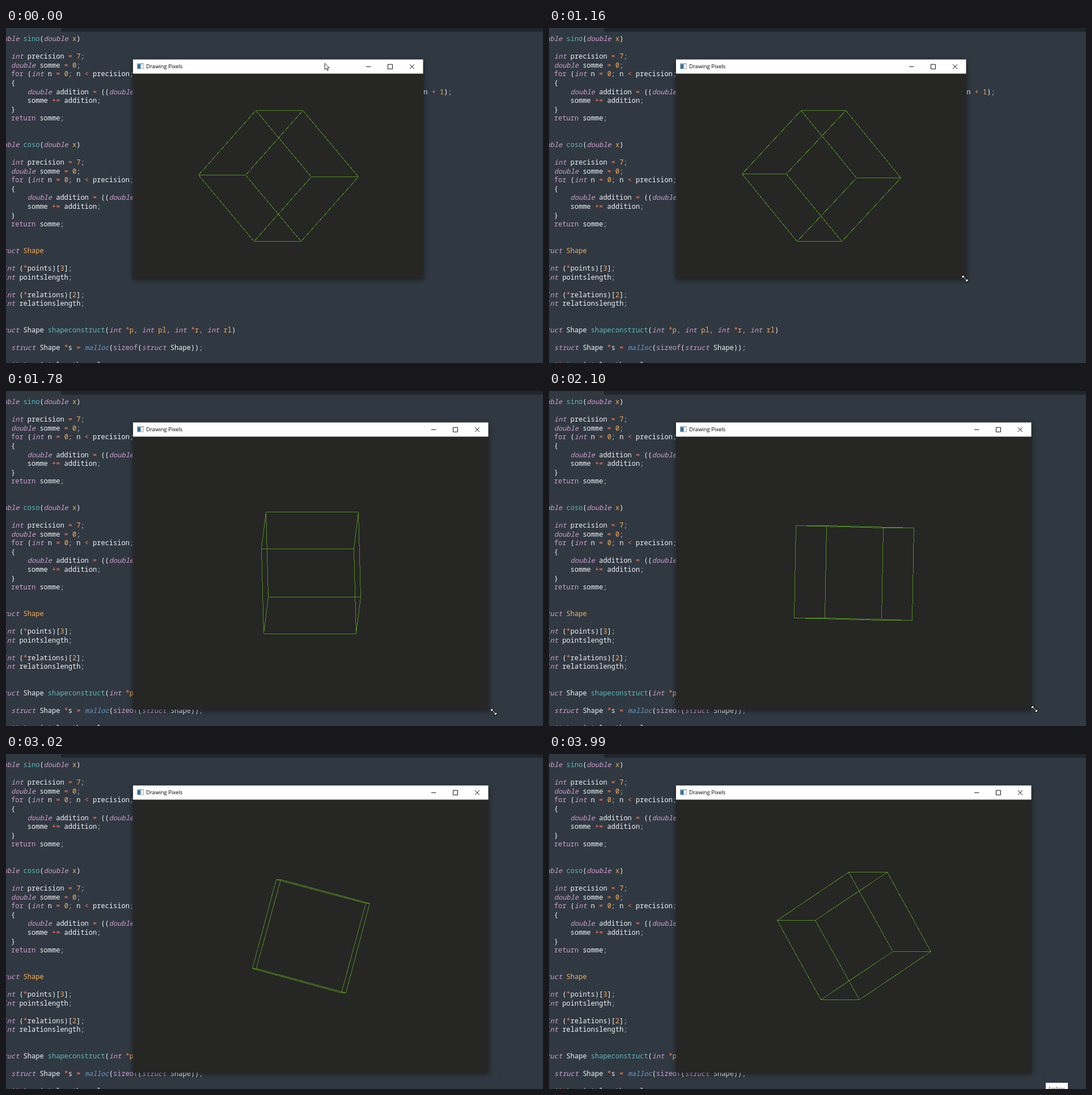
An HTML page for the animation above (4060 ms loop, 947 px wide and 591 px high).

```html
<!DOCTYPE html>
<html lang="en">
<head>
<meta charset="utf-8">
<title>Rotating wireframe cube</title>
<style>
html, body { margin: 0; width: 100%; height: 100%; overflow: hidden; background: #303841; }
svg { display: block; width: 947px; height: 591px; }
text { white-space: pre; }
#code { font: 500 12px "Noto Sans Mono", "DejaVu Sans Mono", monospace; fill: #f0f4f8; }
.type { fill: #d09fd0; font-style: italic; }
.word { fill: #d09fd0; }
.func { fill: #5fb9b9; }
.lib { fill: #6699cc; font-style: italic; }
.value { fill: #f9ae58; }
.op { fill: #f97b58; }
.mark { fill: #a6acb9; }
.ui { font-family: "Open Sans", "Noto Sans", sans-serif; }
#frame { filter: drop-shadow(0 2px 5px rgba(0, 0, 0, .5)); }
</style>
</head>
<body>
<svg viewBox="0 0 947 591">
  <rect width="947" height="591" fill="#303841"/>
  <path d="M97 0H947V6.500H100Q97 6.500 97 3Z" fill="#20262c"/>
  <g id="code"></g>
  <path id="smudge" d="M855 562l5 4v3zM870 562h3v13h-3z" fill="#2d3a39"/>

  <rect id="frame" x="224" y="56" fill="#000"/>
  <rect id="canvas" x="224" y="80" fill="#262625"/>
  <rect id="bar" x="224" y="55.500" height="25" fill="#fff"/>
  <rect x="231" y="62" width="12" height="10.500" fill="#a9b4bd"/>
  <rect x="232" y="64" width="5" height="7.500" fill="#2f70a8"/>
  <rect x="238" y="64" width="4" height="7.500" fill="#eef1f3"/>
  <text class="ui" x="247" y="71.2" font-size="9.5">Drawing Pixels</text>
  <path id="buttons" fill="none" stroke="#111"
    d="M-101 68.200h8.500M-62.500 64.200h8v8h-8zM-24 64.200l8 8m0-8l-8 8"/>
  <path id="cube" fill="none" stroke="#508b1e" shape-rendering="crispEdges"/>

  <g id="tooltip">
    <rect x="876" y="580" width="39" height="14" fill="#fff"/>
    <text class="ui" x="880" y="594" font-size="9" fill="#575757">Arrêter</text>
  </g>
  <g id="pointer">
    <circle id="press" r="10" fill="#969722"/>
    <path id="arrow" d="M0 0V11L2.600 8.700L4.500 12.800L6.300 12L4.500 8H8Z" fill="#fff" stroke="#111" stroke-width=".9"/>
    <g id="resize" stroke-linejoin="round">
      <path d="M-3 -3L3 3M-5 -5h4l-4 4zM5 5h-4l4-4z" stroke="#111" stroke-width="2.400"/>
      <path d="M-3 -3L3 3M-4.500 -4.500h3l-3 3zM4.500 4.500h-3l3-3z" stroke="#fff" fill="#fff"/>
    </g>
    <path id="beam" d="M-2.500 -5.500h5M0 -5.500v11M-2.500 5.500h5" stroke="#e8e8e8" fill="none"/>
  </g>
</svg>
<script>
const LOOP = 4060, LEFT = 224, TOP = 81, EDGE = 163.2;
const GRAB = 1405, RELEASE = 1715;
const $ = id => document.getElementById(id);
const set = (id, attrs) => {
  for (const name in attrs) $(id).setAttribute(name, attrs[name]);
};
const show = (id, on) => set(id, { visibility: on ? "visible" : "hidden" });
const clamp = (v, low, high) => Math.min(high, Math.max(low, v));

// A backtick marks a highlighted name.
const series = (name, tail) => `double ${name}(double \`x)

    int precision = 7;
    double somme = 0;
    for (int n = 0; n < precision; n++)
    {
${"        double addition = ((double".padEnd(105)}${tail}
        somme += addition;
    }
    return somme;

`;
const listing = `${series("sino", "n + 1);")}
${series("coso", "")}
struct \`Shape

  int (*points)[3];
  int pointslength;

  int (*relations)[2];
  int relationslength;


struct Shape shapeconstruct(int *\`p, int \`pl, int *\`r, int \`rl)

    struct Shape *s = malloc(sizeof(struct Shape));

    (*s).pointslength = pl;`;

const rules = [
  ["type", /^(int|double|struct)$/],
  ["word", /^(for|return|sizeof)$/],
  ["func", /^(sino|coso|shapeconstruct)$/],
  ["lib", /^malloc$/],
  ["value", /^(`\w+|\d+)$/],
  ["op", /^[*+=<]+$/],
  ["mark", /^[;,]$/]
];
const clean = token => token.replace("`", "").replace(/</g, "&lt;");
const paint = line => line.replace(/`?\w+|[*+=<]+|[;,]/g, token => {
  const rule = rules.find(([, pattern]) => pattern.test(token));
  return rule ? `<tspan class="${rule[0]}">${clean(token)}</tspan>` : clean(token);
});
$("code").innerHTML = listing.split("\n").map((line, row) =>
  `<text x="-19.8" y="${(23.1 + row * 15.57).toFixed(1)}">${paint(line)}</text>`).join("");

// Keys: [time, value...], joined by straight moves.
const yawKeys = [
  [0, -300.6], [GRAB, -10.8], [RELEASE, -10.8], [2640, 184.5], [3430, 367.2], [3990, 474.5]
];
const pointerKeys = [
  [0, 562, 62], [1150, 733.5, 442], [GRAB, 733.5, 442], [1560, 824, 546], [1700, 861, 567],
  [2100, 856, 562], [2440, 905, 196], [2640, 945.5, 493.5], [2700, 965, 590]
];

function at(keys, t) {
  const i = keys.findIndex(key => key[0] > t);
  if (i < 0) return keys[keys.length - 1].slice(1);
  const from = keys[i - 1], to = keys[i];
  const k = (t - from[0]) / (to[0] - from[0]);
  return from.slice(1).map((v, j) => v + (to[j + 1] - v) * k);
}

// The window corner trails the dragged pointer.
function cornerAt(t) {
  const [x, y] = at(pointerKeys, clamp(t - 50, 0, 1700));
  return [clamp(x + 2.5, 736, 851), clamp(y, 442, 562)];
}

function cubePath(yaw, cx, cy) {
  const a = yaw * Math.PI / 180, b = (yaw * .365 + 65.4) * Math.PI / 180;
  const axes = [
    [Math.cos(a), 0],
    [-Math.sin(b) * Math.sin(a), Math.cos(b)],
    [Math.cos(b) * Math.sin(a), Math.sin(b)]
  ];
  const vertex = i => axes.reduce(([x, y], [ax, ay], bit) => {
    const half = (i >> bit & 1 ? 1 : -1) * EDGE / 2;
    return [x + ax * half, y + ay * half];
  }, [cx, cy]).map(v => Math.floor(v) + .5).join(" ");
  let path = "";
  for (let i = 0; i < 8; i++)
    for (let bit = 0; bit < 3; bit++)
      if (!(i >> bit & 1)) path += `M${vertex(i)}L${vertex(i | 1 << bit)}`;
  return path;
}

function draw(t) {
  const [right, bottom] = cornerAt(t);
  const [innerRight, innerBottom] = cornerAt(t < RELEASE ? 0 : LOOP);
  set("frame", { width: right - LEFT, height: bottom - 56 });
  set("bar", { width: right - LEFT - .4 });
  set("canvas", { width: innerRight - LEFT, height: innerBottom - 80 });
  set("buttons", { transform: `translate(${right} 0)` });
  const [yaw] = at(yawKeys, t);
  set("cube", { d: cubePath(yaw, (LEFT + innerRight) / 2 + .5, (TOP + innerBottom) / 2 - .4) });

  set("pointer", { transform: `translate(${at(pointerKeys, t)})` });
  show("arrow", t < 1130);
  show("resize", t >= 1130 && t < 2200);
  show("beam", t >= 2200);
  show("press", t >= GRAB && t < RELEASE);
  show("smudge", t >= RELEASE);
  set("tooltip", { opacity: clamp((t - 3760) / 200, 0, 1) });
}

const start = performance.now();
function tick() {
  draw((performance.now() - start) % LOOP);
  requestAnimationFrame(tick);
}
tick();
</script>
</body>
</html>
```
